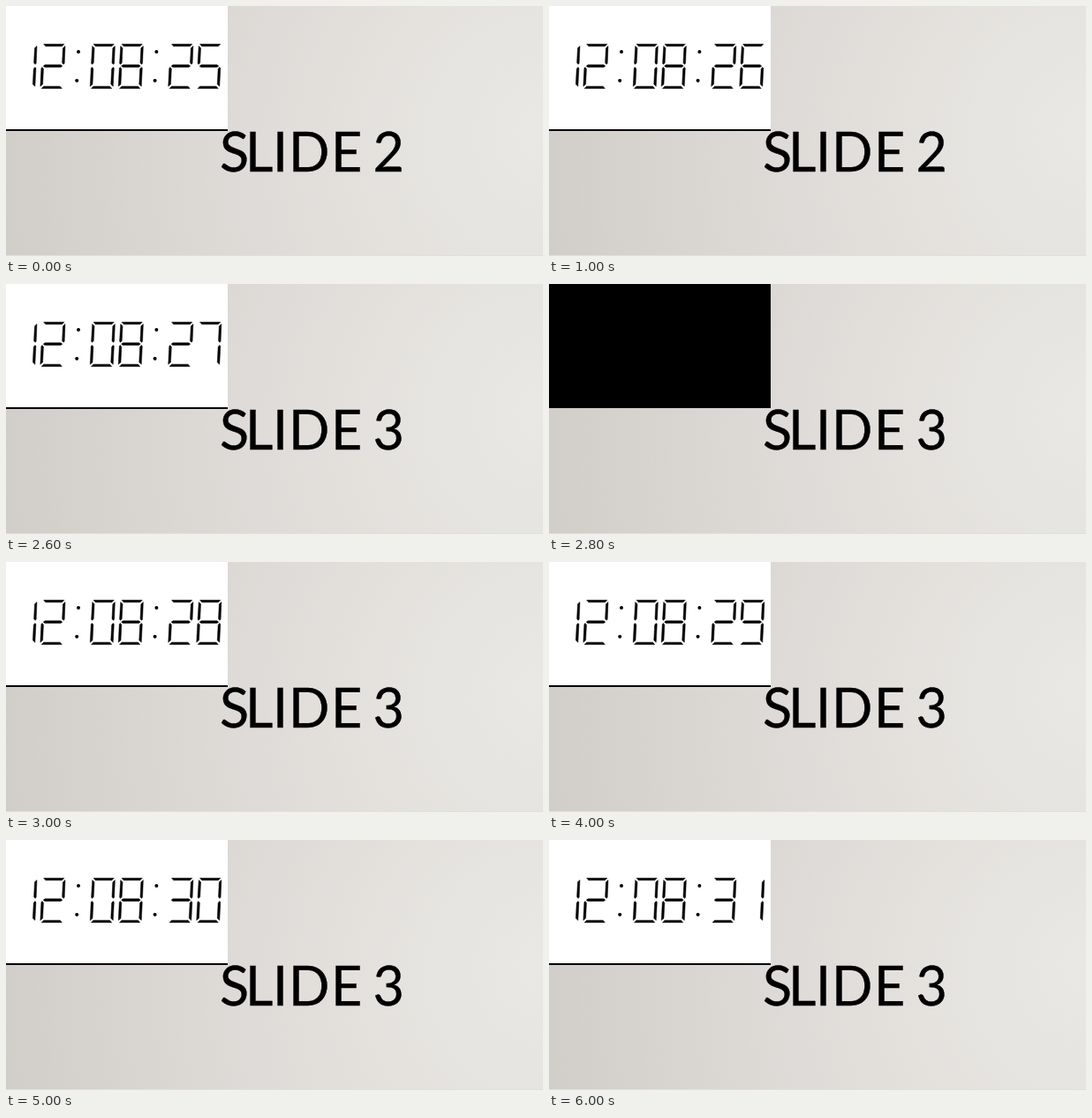
An HTML page that plays this animation: 608x284 px, repeating every 7000 ms.

```html
<!DOCTYPE html>
<html lang="en">
<head>
<meta charset="utf-8">
<title>Slide clock</title>
<style>
  html, body { margin: 0; height: 100%; overflow: hidden; }
  svg { display: block; width: 608px; height: 284px; }
  text { font: 61px Lato, "Open Sans", sans-serif; stroke: #000; stroke-width: .4; }
  #digits { stroke: #000; stroke-width: .5; stroke-linejoin: round; }
</style>
</head>
<body>
<svg viewBox="0 0 608 284">
  <defs>
    <radialGradient id="wall" gradientUnits="userSpaceOnUse" cx="640" cy="190" r="670" fx="612" fy="140">
      <stop offset="0" stop-color="#e9e8e4"/>
      <stop offset=".22" stop-color="#e6e4e0"/>
      <stop offset=".52" stop-color="#dfdbd8"/>
      <stop offset="1" stop-color="#d0ccc7"/>
    </radialGradient>
  </defs>
  <rect width="608" height="284" fill="url(#wall)"/>
  <rect y="283" width="608" height="1" fill="#dfdfe0"/>
  <g id="clock">
    <rect width="251" height="142"/>
    <rect width="251" height="140" fill="#fff"/>
    <g id="digits"></g>
    <circle cx="82" cy="52" r="2"/>
    <circle cx="80.2" cy="84.7" r="2"/>
    <circle cx="170.4" cy="52" r="2"/>
    <circle cx="168.6" cy="84.7" r="2"/>
  </g>
  <rect id="blank" width="251" height="141"/>
  <text id="title" x="242 271 302 320 368 400 415.5" y="188.2" xml:space="preserve"></text>
</svg>
<script>
const LOOP = 7000;
const $ = id => document.getElementById(id);

// Segment outlines in an upright 26.8 x 51 cell, skewed when placed
const SEGMENTS = {
  a: 'M1.8 .3H25L22.7 2.8H4.1Z',
  b: 'M26.2 2.5L23.8 4.8V21.5L25.2 23.3L26.4 22.3Z',
  c: 'M26.4 48.3L23.8 46V28.5L25.2 26.6L26.4 27.5Z',
  d: 'M1.8 50.7H25L22.7 48.2H4.1Z',
  e: 'M.4 48.3L3 46V28.5L1.6 26.6L.4 27.5Z',
  f: 'M.6 2.5L3 4.8V21.5L1.6 23.3L.4 22.3Z',
  g: 'M2.6 25.2L4.4 23.8H22.4L24.2 25.2L22.4 26.6H4.4Z'
};
const LIT = ['abcdef', 'bc', 'abdeg', 'abcdg', 'bcfg', 'acdfg', 'acdefg', 'abc', 'abcdefg', 'abcdfg'];

const cells = [8.9, 40.9, 97.3, 129.3, 185.8, 217.8].map(x => {
  const path = document.createElementNS('http://www.w3.org/2000/svg', 'path');
  path.setAttribute('transform', `translate(${x} 43) skewX(-2.9)`);
  return $('digits').appendChild(path);
});

function draw(now) {
  const t = now % LOOP;
  const time = '1208' + (25 + Math.floor(t / 1000));
  cells.forEach((cell, i) =>
    cell.setAttribute('d', [...LIT[time[i]]].map(s => SEGMENTS[s]).join('')));
  const blank = t >= 2800 && t < 3000;
  $('clock').style.display = blank ? 'none' : '';
  $('blank').style.display = blank ? '' : 'none';
  $('title').textContent = t < 2600 ? 'SLIDE 2' : 'SLIDE 3';
  requestAnimationFrame(() => draw(performance.now() - start));
}

const start = performance.now();
draw(0);
</script>
</body>
</html>
```
